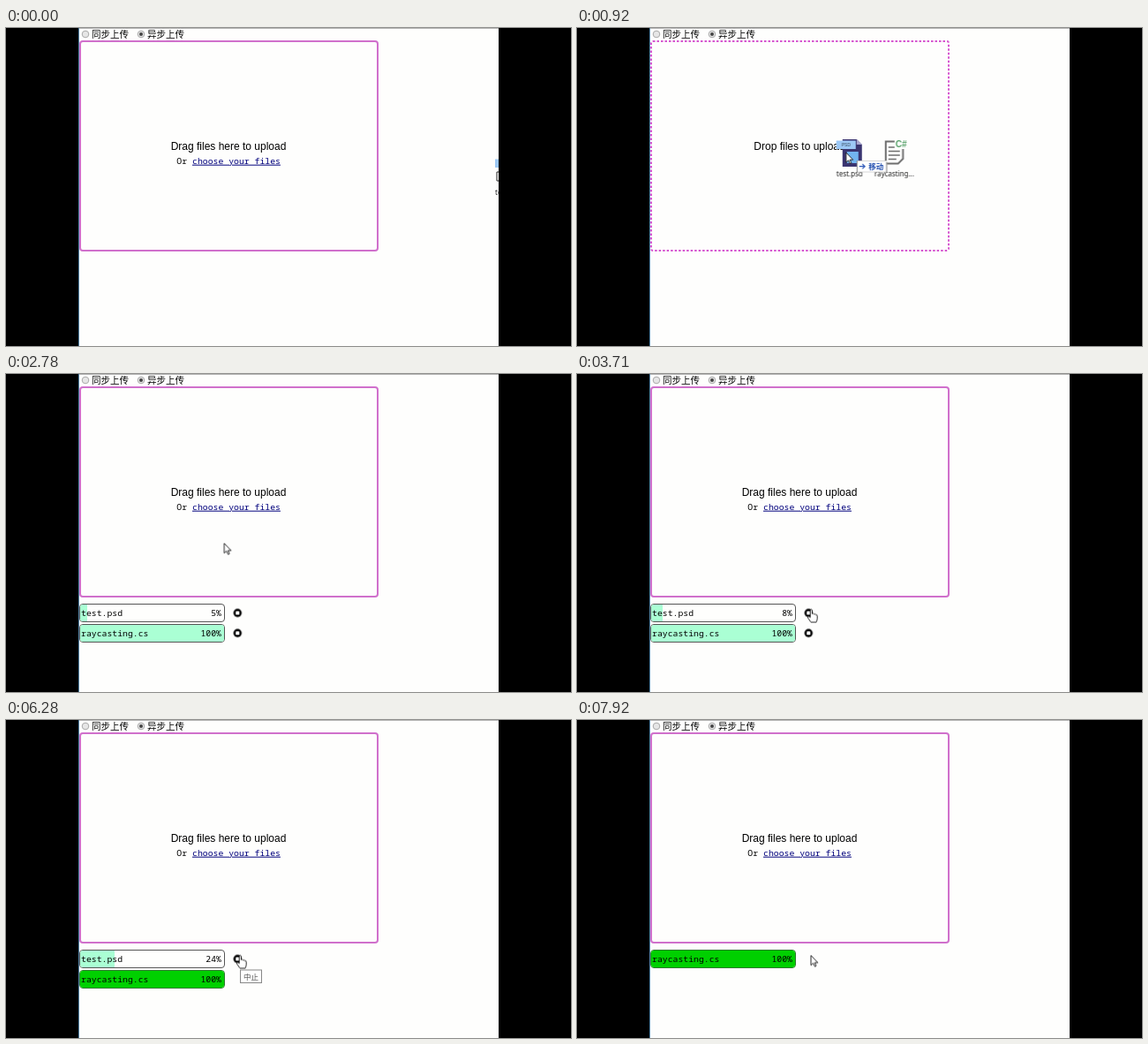
An HTML page for the animation above (8000 ms loop, 640x360 px).

```html
<!DOCTYPE html>
<html lang="zh">
<head>
<meta charset="utf-8">
<title>Upload demo</title>
<style>
@property --p { syntax: "<integer>"; inherits: true; initial-value: 0; }

html, body { margin: 0; width: 100%; height: 100%; overflow: hidden; background: #000; }
#stage { position: absolute; left: 0; top: 0; width: 640px; height: 360px; overflow: hidden; }
svg { position: absolute; left: 0; top: 0; }
text { white-space: pre; }

.cjk { font-family: "Noto Sans CJK SC", "Noto Sans CJK", "Noto Sans CJK JP", sans-serif; }
.title { font: 12px "Liberation Sans", Arial, sans-serif; text-anchor: middle; fill: #000; }
.mono { font: 9.8px "Noto Sans Mono", "DejaVu Sans Mono", monospace; fill: #000; }
.name { font: 8px "Noto Sans", sans-serif; fill: #222; }
.mono.link { fill: #00007c; text-decoration: underline; }

/* One shared 8 s loop; "hard" parts switch without blending. */
.anim { animation: 8s linear infinite; }
.hard { animation: 8s step-end infinite; }

.idle { animation-name: idle; }
.over { animation-name: over; }
.edge { animation-name: edge; }
.ghost { animation-name: ghost, drag; animation-timing-function: linear, step-end; }
.cursor { animation-name: travel, cursor; animation-timing-function: linear, step-end; }
.arrow { animation-name: arrow; }
.hand { animation-name: hand; }
.tip { animation-name: tip; }

@keyframes idle { 0% { opacity: 1 } 6.8% { opacity: 0 } 20.5%, 100% { opacity: 1 } }
@keyframes over { 0% { opacity: 0 } 6.8% { opacity: 1 } 20.5%, 100% { opacity: 0 } }
@keyframes edge { 0% { opacity: 1 } .875%, 100% { opacity: 0 } }
@keyframes drag { 0% { opacity: 1 } 20.5%, 100% { opacity: 0 } }
@keyframes ghost {
  0%, .8% { transform: translate(260px, 21px) }
  11.5% { transform: translate(0, 0); animation-timing-function: ease-out }
  16.9%, 100% { transform: translate(-73px, -13px) }
}
@keyframes cursor { 0% { opacity: 0 } 20.5%, 100% { opacity: 1 } }
@keyframes travel {
  0%, 25% { transform: translate(232px, 128px); animation-timing-function: ease-in-out }
  45.5%, 100% { transform: translate(265px, 266.5px) }
}
@keyframes arrow { 0% { opacity: 1 } 30.3% { opacity: 0 } 32% { opacity: 1 } 43.5% { opacity: 0 } 92.75%, 100% { opacity: 1 } }
@keyframes hand { 0% { opacity: 0 } 30.3% { opacity: 1 } 32% { opacity: 0 } 43.5% { opacity: 1 } 92.75%, 100% { opacity: 0 } }
@keyframes tip { 0% { opacity: 0 } 54.375% { opacity: 1 } 85.625%, 100% { opacity: 0 } }

.row {
  position: absolute; left: 83px; width: 165px; height: 21px; box-sizing: border-box;
  border: 1px solid #555; border-radius: 4px; overflow: hidden;
  font: 9.8px/20px "Noto Sans Mono", "DejaVu Sans Mono", monospace; color: #000;
}
.row b { position: absolute; left: 0; top: 0; height: 100%; width: calc(var(--p) * 1%); background: #aaffd4; }
.row span { position: absolute; left: 1px; }
.row::after { counter-reset: n var(--p); content: counter(n) "%"; position: absolute; right: 3px; }

.psd { top: 260px; animation-name: psd, listed; animation-timing-function: linear, step-end; }
.cs { top: 283px; animation-name: cs, shown, lift, outline; animation-timing-function: linear, step-end, step-end, step-end; }
.cs b { animation-name: done; }
.stop1 { animation-name: listed; }
.stop2 { animation-name: stop2; }

@keyframes psd {
  0%, 20.5% { --p: 0 } 23.125% { --p: 2 } 46.375% { --p: 8 }
  67.75% { --p: 18 } 78.5% { --p: 24 } 92.75%, 100% { --p: 32 }
}
@keyframes cs { 0%, 20.5% { --p: 0 } 23.125% { --p: 31 } 29.5%, 100% { --p: 100 } }
@keyframes listed { 0% { opacity: 0 } 20.5% { opacity: 1 } 92.75%, 100% { opacity: 0 } }
@keyframes shown { 0% { opacity: 0 } 20.5%, 100% { opacity: 1 } }
@keyframes stop2 { 0% { opacity: 0 } 20.5% { opacity: 1 } 75.5%, 100% { opacity: 0 } }
@keyframes lift { 0% { transform: none } 92.75%, 100% { transform: translateY(-23px) } }
@keyframes done { 0% { background: #aaffd4 } 75.5%, 100% { background: #00d000 } }
@keyframes outline { 0% { border-color: #555 } 75.5%, 100% { border-color: #2c7a2c } }
</style>
</head>
<body>
<div id="stage">
  <svg width="640" height="360">
    <rect x="82" width="476" height="360" fill="#fefefd"/>
    <path d="M82 .5H558" stroke="#b5b5b5"/>
    <path d="M82.5 0V360" stroke="#5585a8"/>

    <g fill="#e6e6e6" stroke="#a9a9a9">
      <circle cx="90" cy="7" r="3.8"/>
      <circle cx="153" cy="7" r="3.8"/>
    </g>
    <circle cx="153" cy="7" r="2" fill="#444"/>
    <g class="cjk" font-size="10.5" fill="#000">
      <text x="97" y="11">同步上传</text>
      <text x="160" y="11">异步上传</text>
    </g>

    <g class="hard idle">
      <rect x="84" y="15" width="337" height="237" rx="3" fill="none" stroke="#d070cc" stroke-width="2"/>
      <text class="title" x="252" y="137.5">Drag files here to upload</text>
      <text class="mono" x="193.3" y="153.7">Or</text>
      <text class="mono link" x="211" y="153.7">choose your files</text>
    </g>
    <g class="hard over">
      <rect x="84" y="15" width="337" height="237" rx="2" fill="none" stroke="#d656d0" stroke-width="2" stroke-dasharray="2.5 2"/>
      <text class="title" x="252" y="137.5">Drop files to upload</text>
    </g>
  </svg>

  <div class="row anim psd"><b></b><span>test.psd</span></div>
  <div class="row anim cs"><b class="hard"></b><span>raycasting.cs</span></div>

  <svg width="640" height="360">
    <defs>
      <clipPath id="page"><rect x="82" width="476" height="360"/></clipPath>
      <path id="pointer" d="M0 0V11.2L2.6 8.8L4.4 12.6L6 11.9L4.3 8.2H7.8Z" fill="#fff" stroke="#111" stroke-width=".9"/>
      <g id="stop"><circle r="4.7" fill="#000"/><rect x="-2.1" y="-2.1" width="4.2" height="4.2" rx="1.2" fill="#fff"/></g>
    </defs>

    <use class="hard stop1" href="#stop" x="262.3" y="270.5"/>
    <use class="hard stop2" href="#stop" x="262.3" y="293.3"/>

    <g class="hard tip">
      <rect x="265.5" y="283" width="24" height="14.5" fill="#fff" stroke="#888"/>
      <text class="cjk" x="269" y="293.5" font-size="8.5" fill="#555">中止</text>
    </g>

    <g clip-path="url(#page)">
      <path class="hard edge" d="M559 163H556V173H559" fill="none" stroke="#222"/>
      <g class="anim ghost">
        <path d="M301 126H317L323 132V157H301Z" fill="#3a3470"/>
        <path d="M317 126V132H323Z" fill="#a9a6d0"/>
        <rect x="306" y="140" width="13" height="13" fill="#72b4f0"/>
        <rect x="294" y="127.5" width="22" height="9.5" fill="#9cc8f6"/>
        <text x="300" y="134.4" font-family="Noto Sans, sans-serif" font-size="5.5" fill="#345">PSD</text>

        <g fill="none" stroke="#6e6e6e" stroke-width="2">
          <path d="M360 128.5H350V153.5H364L369.5 148V137"/>
          <path d="M353 135H360M353 139.5H366M353 144H366M353 148.5H362" stroke-width="1.6"/>
        </g>
        <text x="361" y="134.5" font-family="Liberation Sans, sans-serif" font-size="10" font-weight="700" fill="#55a068">C#</text>

        <text class="name" x="294" y="168">test.psd</text>
        <text class="name" x="337" y="168">raycasting...</text>

        <rect x="317.5" y="150.5" width="33.5" height="12.5" fill="#fff" stroke="#ccc" stroke-width=".8"/>
        <path d="M317.5 150V163M351 152V163" stroke="#777" stroke-width=".8"/>
        <path d="M320 156.7H326M323.5 154L326.3 156.7L323.5 159.4" fill="none" stroke="#2d58b8" stroke-width="1.2"/>
        <text class="cjk" x="330.5" y="160" font-size="8.5" font-weight="700" fill="#2450b0">移动</text>
        <use href="#pointer" x="305" y="141"/>
      </g>
      <g class="anim cursor">
        <use class="hard arrow" href="#pointer"/>
        <path class="hard hand" d="M-.8 .8Q.3 -.8 1.4 .8V5Q2.8 4 3.6 5.4Q5 4.8 5.6 6Q7.2 5.8 7.2 7.4V10.5Q7 12.5 6 14.5H0L-3.6 9.4Q-3.8 7.4 -2 8L-.8 9.2Z" fill="#fff" stroke="#111" stroke-width=".9"/>
      </g>
    </g>
  </svg>
</div>
</body>
</html>
```
